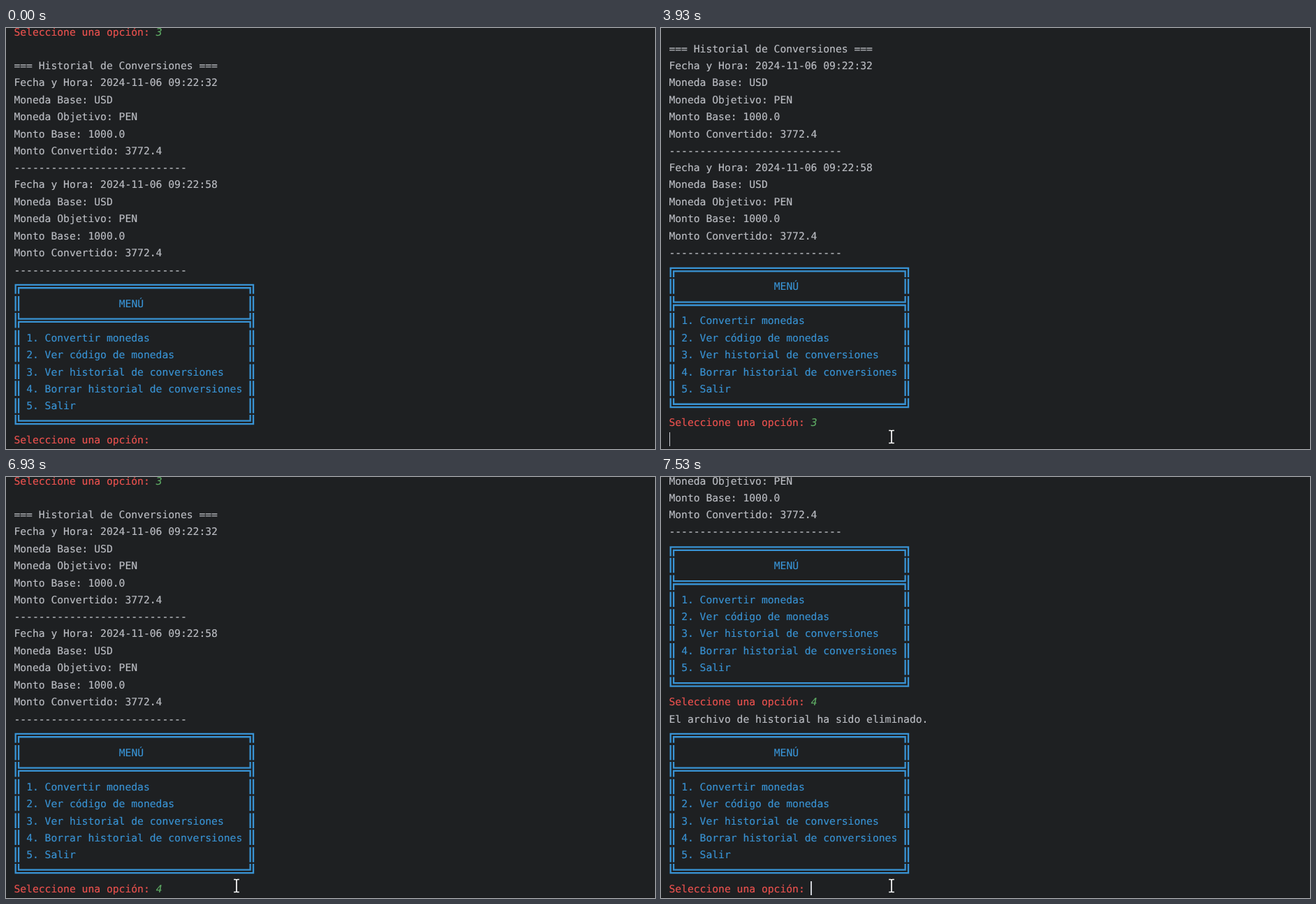
An HTML page for the animation above (8000 ms loop, 929 px wide and 603 px high).

```html
<!DOCTYPE html>
<html lang="es">
<head>
<meta charset="utf-8">
<title>Historial de conversiones</title>
<style>
  html, body { margin: 0; width: 100%; height: 100%; overflow: hidden; background: #1e2022; }
  svg { display: block; }
  text {
    font: 14.685px "DejaVu Sans Mono", "Noto Sans Mono", monospace;
    text-rendering: geometricPrecision;
    white-space: pre;
    color: #bcbec4;
    fill: currentColor;
    stroke: currentColor;
    stroke-width: .15;
  }
  .menu { color: #3993d4; }
  .ask { color: #ec524f; }
  .key { color: #5fad65; font-style: italic; }
  .frame { fill: none; stroke: #3993d4; stroke-width: 2.3; }
  #caret { fill: #ced0d6; }
</style>
</head>
<body>
<svg width="929" height="603" viewBox="0 0 929 603">
  <g id="screen"></g>
  <rect id="caret" height="20" y="579"/>
  <g id="mouse" fill="none" stroke-linecap="square">
    <path d="M-3 -9H-1.5Q0 -9 0 -7.5V7.5Q0 9 -1.5 9H-3M3 -9H1.5Q0 -9 0 -7.5M0 7.5Q0 9 1.5 9H3" stroke="#fff" stroke-width="1.7"/>
  </g>
  <rect y="602" width="929" height="1" fill="#18191b"/>
</svg>
<script>
const LOOP = 8000, LEFT = 11.45, CELL = 8.841, LAST = 24;
const $ = id => document.getElementById(id);

// Rows sit on whole device pixels, 27.5 apart, shown at a reduced scale
const rowTop = row => Math.floor(row * 27.5) * .8855;

const record = time => [
  `Fecha y Hora: 2024-11-06 ${time}`,
  "Moneda Base: USD",
  "Moneda Objetivo: PEN",
  "Monto Base: 1000.0",
  "Monto Convertido: 3772.4",
  "-".repeat(28)
];
const history = ["", "=== Historial de Conversiones ===", ...record("09:22:32"), ...record("09:22:58")];
const menu = [
  { edge: "top" },
  { col: 17, label: "MENÚ" },
  { edge: "mid" },
  ...["Convertir monedas", "Ver código de monedas", "Ver historial de conversiones",
      "Borrar historial de conversiones", "Salir"]
    .map((s, i) => ({ col: 2, label: `${i + 1}. ${s}` })),
  { edge: "bottom" }
];
const ask = (key = "") => ({ key });
const before = [...history, ...menu, ask("3"), ...history, ...menu];
const after = [...before, ask("4"), "El archivo de historial ha sido eliminado.", ...menu, ask()];

// Terminal contents over time; lag = lines still hidden below the viewport
const states = [
  { at: 0, lines: [...before, ask()] },
  { at: 3730, lines: [...before, ask("3")] },
  { at: 3930, lines: [...before, ask("3"), ""] },
  { at: 4130, lines: [...before, ask()], lag: 5 },
  { at: 4200, lines: [...before, ask()] },
  { at: 6070, lines: [...before, ask("4")] },
  { at: 7270, lines: [...before, ask("4"), ""] },
  { at: 7470, lines: after, lag: 5 },
  { at: 7530, lines: after }
];
const caretOn = [[930, 1800], [2330, 2870], [3330, 4130], [4200, 4930],
                 [5400, 5930], [6070, 6930], [7270, 7470], [7530, LOOP]];

const text = (col, row, cls, s) =>
  `<text class="${cls}" x="${LEFT + col * CELL}" y="${rowTop(row) + 10.6}">${s}</text>`;

function frame(row, edge) {
  const c = rowTop(row) + 5.2, g = 2.2, cap = 1.15;
  const l = LEFT + .5 * CELL, r = l + 38 * CELL, up = c - 10.8, down = c + 10.8;
  const v = (x, a, b) => `M${x} ${a}V${b}`;
  const h = (y, d) => `M${l - d - cap} ${y}H${r + d + cap}`;
  const both = (d, a, b) => v(l - d, a, b) + v(r + d, a, b);
  const d = {
    top: () => h(c - g, g) + h(c + g, -g) + both(g, c - g, down) + both(-g, c + g, down),
    bottom: () => h(c + g, g) + h(c - g, -g) + both(g, up, c + g) + both(-g, up, c - g),
    mid: () => h(c - g, -g) + h(c + g, -g) + both(g, up, down) + both(-g, up, c - g) + both(-g, c + g, down),
    side: () => both(g, up, down) + both(-g, up, down)
  }[edge]();
  return `<path class="frame" d="${d}"/>`;
}

function draw(line, row) {
  if (typeof line === "string") return text(0, row, "", line);
  if (line.edge) return frame(row, line.edge);
  if (line.label) return frame(row, "side") + text(line.col, row, "menu", line.label);
  return text(0, row, "ask", "Seleccione una opción:") + text(23, row, "key", line.key);
}

function show({ lines, lag = 0 }) {
  const first = lines.length - 1 - LAST - lag;
  $("screen").innerHTML = lines.slice(first, first + LAST + 2).map(draw).join("");
}

function moveMouse(t) {
  const k = Math.min(11, Math.floor((t - 200) / 66.4 + 1e-6));
  const rest = (1 - Math.max(0, k) / 11) ** 2;
  const x = Math.round(330 + 534 * rest), y = Math.round(586 - 45 * rest) - .5;
  $("mouse").setAttribute("transform", `translate(${x} ${y})`);
  $("mouse").style.visibility = t < 200 ? "hidden" : "visible";
}

function moveCaret(t, lines) {
  const end = lines[lines.length - 1];
  const atStart = end === "";
  $("caret").setAttribute("x", atStart ? 12 : end.key ? 223 : 214);
  $("caret").setAttribute("width", atStart ? 1 : 2);
  $("caret").style.visibility = caretOn.some(([a, b]) => t >= a && t < b) ? "visible" : "hidden";
}

let shown;
function tick() {
  const t = performance.now() % LOOP;
  const state = states.filter(s => s.at <= t).pop();
  if (state !== shown) show(shown = state);
  moveCaret(t, state.lines);
  moveMouse(t);
  requestAnimationFrame(tick);
}
tick();
</script>
</body>
</html>
```
